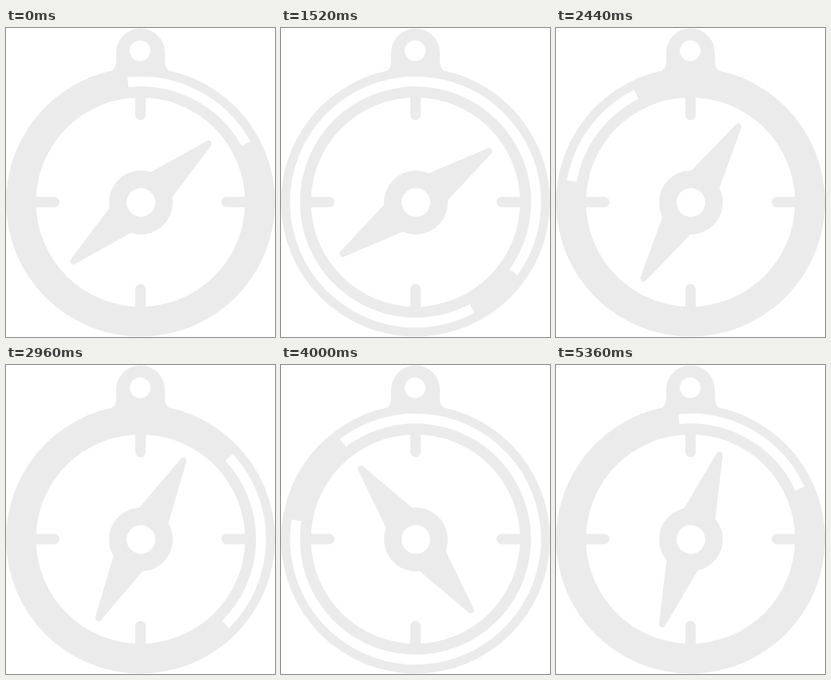
These frames come from a looping animation (337 px wide and 387 px high, 5400 ms). An HTML page:

```html
<!DOCTYPE html>
<html lang="en">
<head>
<meta charset="utf-8">
<title>Compass</title>
<style>
  html, body { margin: 0; width: 100%; height: 100%; overflow: hidden; background: #fff; }
  svg { display: block; width: 337px; height: 387px; }
</style>
</head>
<body>
<svg viewBox="0 0 337 387" fill="#ebebeb">
  <path d="M124 58Q138 54 138 42V31A30.5 30.5 0 0 1 199 31V42Q199 54 213 58Z"/>
  <circle cx="168.5" cy="218" r="168.5"/>
  <circle cx="168" cy="28.5" r="13" fill="#fff"/>
  <g transform="translate(168.5 218)">
    <circle r="131" fill="#fff"/>
    <path d="M0-133V-109M0 133V109M-133 0H-108M133 0H108" stroke="#ebebeb" stroke-width="13" stroke-linecap="round"/>
    <circle id="arc" r="151" pathLength="360" fill="none" stroke="#fff" stroke-width="12.5"/>
  </g>
  <g transform="translate(169 218.5)">
    <g id="needle">
      <path d="M0-112L17-32V32L0 112L-17 32V-32Z" stroke="#ebebeb" stroke-width="8" stroke-linejoin="round"/>
      <circle r="40"/>
      <circle r="18" fill="#fff"/>
    </g>
  </g>
</svg>
<script>
const arc = document.getElementById('arc');
const needle = document.getElementById('needle');
const period = 2700, step = 40;

// 0 before a, 1 after b, linear between
const ramp = (t, a, b) => Math.min(1, Math.max(0, (t - a) / (b - a)));

// Slow, fast, then medium rotation within each period, in degrees clockwise from the top
const arcMiddle = t =>
  27.5 + 144.5 * ramp(t, 0, 590) + 1184 * ramp(t, 590, 1407) + 489 * ramp(t, 1407, period);
const needleAngle = t =>
  49 + 429 * ramp(t, 0, 700) + 1017 * ramp(t, 700, 1520) + 894 * ramp(t, 1520, period);

// The arc creeps longer, stretches suddenly and later shrinks back
const arcLength = t =>
  67 + 0.08 * t + 145 * ramp(t, 650, 790) - 354 * ramp(t, 1600, 2400);

const start = performance.now();
function draw(now) {
  const t = Math.floor(Math.max(0, now - start) / step) * step % (2 * period) % period;
  const length = arcLength(t);
  arc.setAttribute('stroke-dasharray', `${length} 360`);
  arc.setAttribute('transform', `rotate(${arcMiddle(t) - length / 2 - 90})`);
  needle.setAttribute('transform', `rotate(${needleAngle(t)})`);
  requestAnimationFrame(draw);
}
draw(start);
</script>
</body>
</html>
```
